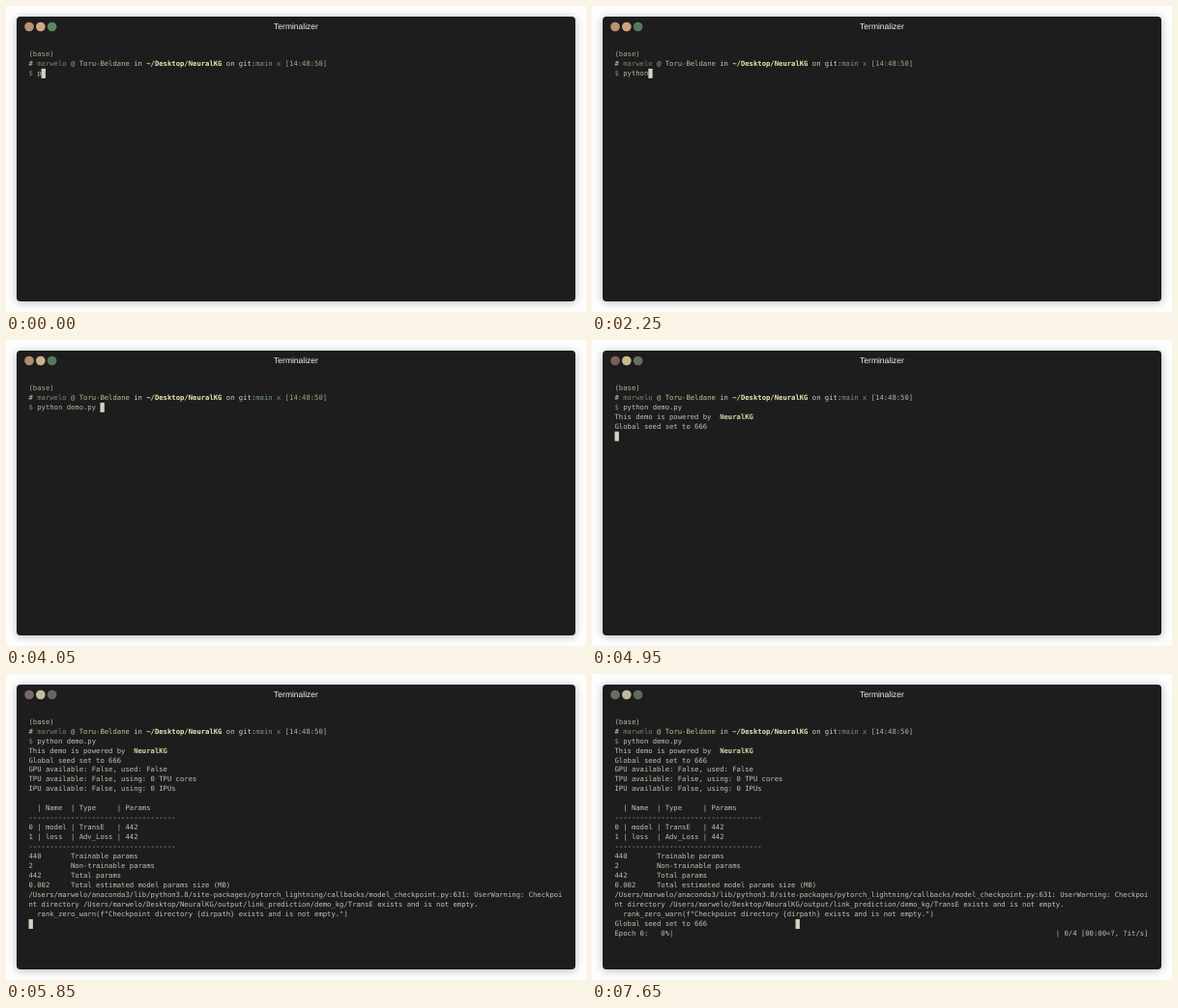
Write an HTML page with a canvas that moves like this. It is 600x317 px and loops after 8 s.

```html
<!DOCTYPE html>
<html lang="en">
<head>
<meta charset="utf-8">
<title>Terminal session</title>
<style>
  html, body { margin: 0; width: 100%; height: 100%; overflow: hidden; background: #fdfdfd; }
  #stage { position: relative; width: 600px; height: 317px; overflow: hidden; }
  #window {
    position: absolute; left: 11px; top: 11px; width: 578px; height: 295px;
    border-radius: 4px; background: #1d1d1d; box-shadow: 0 1px 9px rgba(0, 0, 0, .28);
  }
  canvas { position: absolute; left: 0; top: 0; width: 600px; height: 317px; }
  #title {
    position: absolute; left: 0; top: 16px; width: 600px; text-align: center;
    font: 8.5px/11px "Liberation Sans", Arial, sans-serif; color: #f6f3e2;
    text-rendering: geometricPrecision;
  }
  #screen {
    position: absolute; left: 23.5px; top: 44.7px; margin: 0; white-space: pre;
    font: 7.225px/9.955px "DejaVu Sans Mono", monospace;
    font-variant-ligatures: none; text-rendering: geometricPrecision; color: var(--text);
  }
  .base { color: var(--base); }
  .user { color: var(--user); }
  .host { color: var(--host); }
  .path { color: #ece4b2; font-weight: bold; }
  .plain { color: #d2d0bc; }
  .branch { color: var(--branch); }
  .mark { color: #8d8672; }
  .brand { color: #dad5a2; font-weight: bold; }
</style>
</head>
<body>
<div id="stage">
  <div id="window"></div>
  <canvas id="shapes"></canvas>
  <div id="title">Terminalizer</div>
  <pre id="screen"></pre>
</div>
<script>
const LOOP = 8000, STEP = 450;
const CELL_W = 4.35, CELL_H = 9.955, LEFT = 23.5, TOP = 45;
const COLS = 127;
const USER = "marwelo", HOST = "Toru-Beldane";
const COMMAND = "python demo.py ";

const screen = document.getElementById("screen");
const canvas = document.getElementById("shapes");
const ctx = canvas.getContext("2d");
const ratio = window.devicePixelRatio || 1;
canvas.width = 600 * ratio;
canvas.height = 317 * ratio;
ctx.scale(ratio, ratio);

// Button and text tints, each valid from its step onward.
const tints = [
  { from: 0, buttons: ["#b9926f", "#d3aa82", "#5a8660"] },
  { from: 3, buttons: ["#b9926f", "#cfa57d", "#567a60"] },
  { from: 7, buttons: ["#b8906d", "#cda87f", "#587b60"] },
  { from: 9, buttons: ["#b08d74", "#cdb08a", "#567660"] },
  { from: 10, buttons: ["#7a605b", "#c9bb8d", "#667061"] },
  { from: 13, buttons: ["#776869", "#c5bb9d", "#636463"] },
  { from: 17, buttons: ["#6e6a65", "#c0b8a0", "#5f6a5d"] }
];
const typingColors = { text: "#b4b598", base: "#a4ab84", user: "#71866f", host: "#b7bb94", branch: "#7f9d7f" };
const outputColors = { text: "#c2c1b3", base: "#b4b4a2", user: "#7d7d75", host: "#c4c098", branch: "#828f82" };

const prompt = [
  ["plain", "# "], ["user", USER], ["base", " @ "], ["host", HOST], ["plain", " in "],
  ["path", "~/Desktop/NeuralKG"], ["plain", " on git:"], ["branch", "main"],
  ["mark", " x "], ["base", "[14:48:50]"]
];
const startup = [
  [["", "This demo is powered by  "], ["brand", "NeuralKG"]],
  "Global seed set to 666"
];
const devices = [
  "GPU available: False, used: False",
  "TPU available: False, using: 0 TPU cores",
  "IPU available: False, using: 0 IPUs"
];
const rule = "-".repeat(35);
const summary = [
  "",
  "  | Name  | Type     | Params",
  rule,
  "0 | model | TransE   | 442",
  "1 | loss  | Adv_Loss | 442",
  rule,
  "440       Trainable params",
  "2         Non-trainable params",
  "442       Total params",
  "0.002     Total estimated model params size (MB)",
  `/Users/${USER}/anaconda3/lib/python3.8/site-packages/pytorch_lightning/callbacks/model_checkpoint.py:631: UserWarning: Checkpoi`,
  `nt directory /Users/${USER}/Desktop/NeuralKG/output/link_prediction/demo_kg/TransE exists and is not empty.`,
  '  rank_zero_warn(f"Checkpoint directory {dirpath} exists and is not empty.")'
];

function progress(label, total) {
  const head = `${label}   0%|`;
  const tail = `| 0/${total} [00:00<?, ?it/s]`;
  return head + tail.padStart(COLS - head.length);
}

function typed(step) {
  return step < 9 ? COMMAND.slice(0, step + 1) : COMMAND;
}

function stateAt(step) {
  const command = typed(step);
  const lines = [[["base", "(base)"]], prompt, [["mark", "$ "], ["", command]]];
  let cursor = [2 + command.length, 2];
  if (step >= 10) cursor = [0, 3];
  if (step >= 11) { lines.push(...startup); cursor = [0, 5]; }
  if (step >= 12) { lines.push(...devices); cursor = [0, 8]; }
  if (step >= 13) { lines.push(...summary); cursor = [0, 21]; }
  if (step >= 14) cursor = [43, 21];
  if (step === 14) lines.push("Validation sanity check: 0it [00:00, ?it/s]");
  if (step === 15 || step === 16) lines.push(progress("Validation sanity check:", 1));
  if (step >= 17) lines.push("Global seed set to 666", progress("Epoch 0:", 4));
  return { lines, cursor };
}

function drawText(lines) {
  screen.textContent = "";
  for (const line of lines) {
    const parts = typeof line === "string" ? [["", line]] : line;
    for (const [style, text] of parts) {
      const span = document.createElement("span");
      span.className = style;
      span.textContent = text;
      screen.append(span);
    }
    screen.append("\n");
  }
}

function drawShapes(buttons, [col, row]) {
  ctx.clearRect(0, 0, 600, 317);
  buttons.forEach((color, i) => {
    ctx.fillStyle = color;
    ctx.beginPath();
    ctx.arc(24 + i * 11.8, 21.5, 4.8, 0, Math.PI * 2);
    ctx.fill();
  });
  ctx.fillStyle = "#d5d2c2";
  ctx.fillRect(LEFT + col * CELL_W, TOP + row * CELL_H, CELL_W, CELL_H);
}

function render(step) {
  const { lines, cursor } = stateAt(step);
  const colors = step < 10 ? typingColors : outputColors;
  for (const name in colors) screen.style.setProperty("--" + name, colors[name]);
  drawText(lines);
  drawShapes(tints.filter(t => t.from <= step).pop().buttons, cursor);
}

let shown = -1;
function tick() {
  const step = Math.floor((performance.now() % LOOP) / STEP);
  if (step !== shown) {
    shown = step;
    render(step);
  }
  requestAnimationFrame(tick);
}
tick();
</script>
</body>
</html>
```
